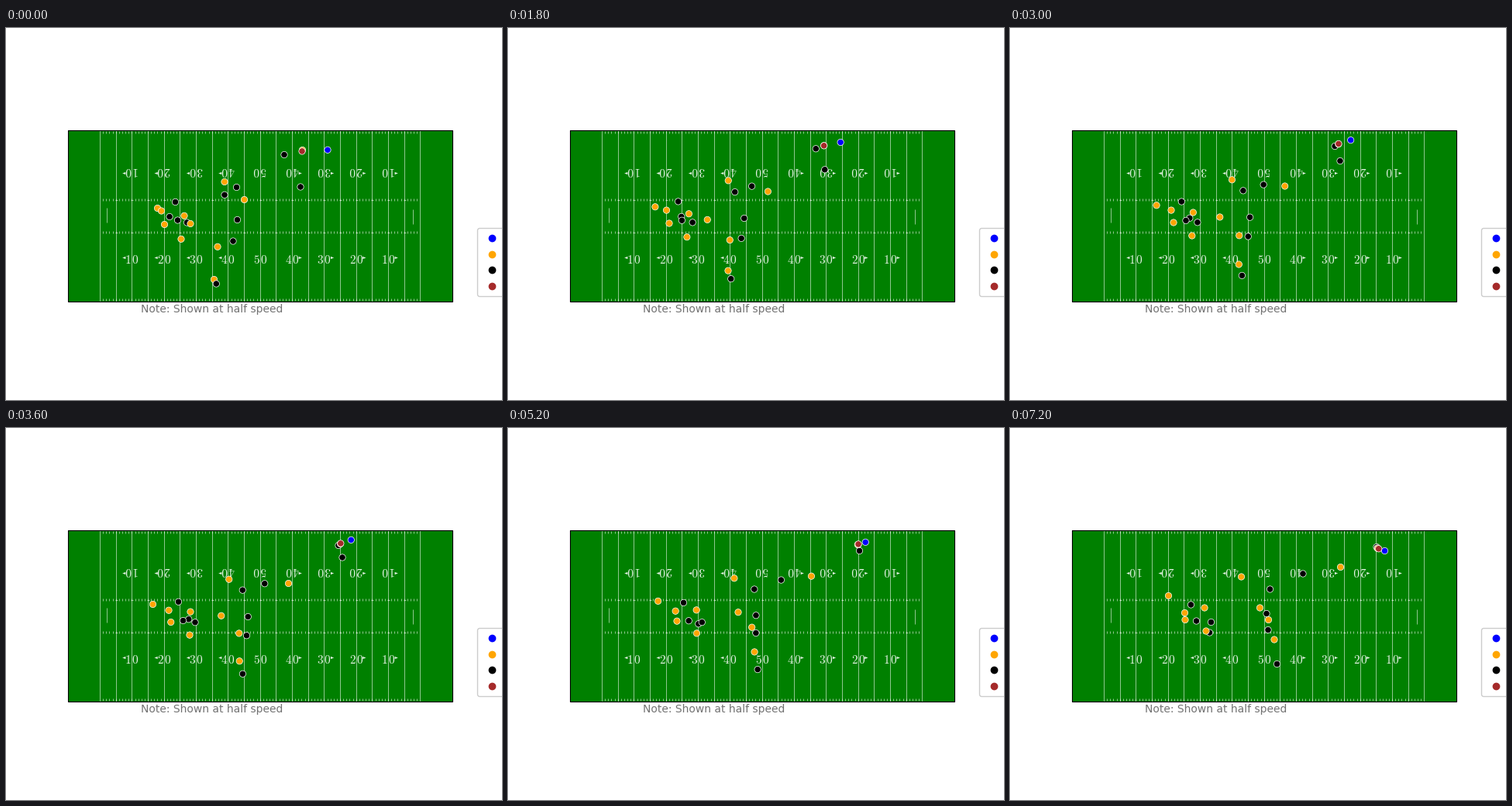
Write a matplotlib script that moves like this. It is 640 px wide and 480 px high and loops after 7.4 s.

```python
import numpy as np
import matplotlib.pyplot as plt
from matplotlib.animation import FuncAnimation
from matplotlib.patches import FancyBboxPatch, Polygon, Rectangle

plt.rcParams["font.family"] = "DejaVu Sans"

W, H = 640, 480
FRAMES, INTERVAL = 37, 200
LEFT, RIGHT, TOP, BOTTOM = 80, 576, 132.3, 352.6
YARD = (RIGHT - LEFT) / 120
CHALK = dict(colors="white", linewidths=0.4, zorder=2)

PROGRESS = np.linspace(0, 1, FRAMES)[:, None]
SLOW_START = (-2.5, 0)


def run(start, end, bend=SLOW_START):
    """Parabolic path: bend is how far the middle lies off the straight line."""
    start, end, bend = map(np.array, (start, end, bend))
    u = PROGRESS
    return start + (end - start) * u + 4 * u * (1 - u) * bend


# Painted from back to front
DEFENSE = [
    run((218.5, 224.5), (233.5, 228), (-3.5, -2)),
    run((211, 243.5), (257.5, 264), (1.5, -7)),
    run((221.5, 248), (240.5, 249)),
    run((233.5, 251), (259.5, 250.5)),
    run((282, 215.3), (335.5, 208), (-3.5, -2.5)),
    run((297.5, 205.5), (378, 188), (-4, 4)),
    run((298.5, 247.5), (331, 239.5)),
    run((293, 275), (333, 260.5)),
    run((359, 163.5), (473, 153.5), (13, -7)),
    run((380, 205), (474, 155), (7, -13)),
]
OFFENSE = [
    run((195.5, 232.5), (204.5, 216.5), (-10.5, 3)),
    run((200.5, 236), (225.5, 238.5), (-3, -2)),
    run((204.5, 253.5), (226, 247.5)),
    run((230, 242.3), (251, 232)),
    run((226, 272.3), (253, 262)),
    run((238, 252.5), (322.5, 232)),
    run((273, 282.3), (333.5, 247.5)),
    run((268.5, 324.5), (341, 273), (-3.5, 2)),
    run((282, 198.5), (298.5, 192)),
    run((307.5, 221.5), (426.5, 179.5)),
    run((382.5, 157.5), (474.5, 155.3), (3, -7)),
]
SAFETY = [run((271.3, 330), (344.5, 304.5))]
RUNNER = [run((415, 157.3), (483.5, 158.5), (-4, -13.5))]
BALL = [run((382, 159), (475.7, 155.8), (3, -8.5))]

GROUPS = [("black", DEFENSE), ("orange", OFFENSE), ("black", SAFETY),
          ("blue", RUNNER), ("brown", BALL)]


def yard_x(yards):
    return LEFT + np.asarray(yards) * YARD


def chalk_x(yards):
    """Whole-pixel column of a chalk line."""
    return np.floor(yard_x(yards) + 0.2)


def draw_number(yards, upside_down):
    x, side = yard_x(yards), np.sign(yards - 60)
    tens = 5 - abs(yards - 60) // 10
    y, arrow_y = (184.5, 187.5) if upside_down else (299.5, 296.5)
    ax.text(x, y, rf"${tens}\,0$", color="white", alpha=0.9, fontsize=11,
            rotation=180 * upside_down, ha="center", va="center",
            math_fontfamily="cm", zorder=3)
    if side:
        tip, base = x + 12.5 * side, x + 8.3 * side
        ax.add_patch(Polygon([(tip, arrow_y), (base, arrow_y - 1.6),
                              (base, arrow_y + 1.6)],
                             fc="white", ec="none", alpha=0.9, zorder=3))


def draw_field():
    box = (LEFT, TOP), RIGHT - LEFT, BOTTOM - TOP
    ax.add_patch(Rectangle(*box, fc="green", ec="none", zorder=1))
    ax.add_patch(Rectangle(*box, fc="none", ec="black", lw=0.8, zorder=4))

    ax.vlines(chalk_x(range(10, 111, 5)), TOP, BOTTOM, **CHALK)
    for y in (134.5, 221, 263.5, 350.5):
        ax.vlines(chalk_x(range(11, 110)), y - 1.5, y + 1.5, **CHALK)
    crosses = chalk_x(range(15, 110, 5)) + 0.5
    for y in (221.5, 263.5):
        ax.hlines([y] * len(crosses), crosses - 1.5, crosses + 1.5, **CHALK)

    ax.vlines(130, 231.5, 251, **CHALK)
    ax.vlines(525, 233.5, 253, **CHALK)

    for yards in range(20, 101, 10):
        draw_number(yards, False)
        draw_number(yards, True)


def draw_legend():
    ax.add_patch(FancyBboxPatch((608.5, 258.5), 120, 88, fc="white", ec="0.8",
                                lw=1, zorder=6,
                                boxstyle="round,pad=0,rounding_size=2.8"))
    for i, color in enumerate(("blue", "orange", "black", "brown")):
        ax.plot(627, 271 + 20.7 * i, "o", color=color, ms=6, zorder=7)


fig = plt.figure(figsize=(W / 100, H / 100), dpi=100, facecolor="white")
ax = fig.add_axes([0, 0, 1, 1])
ax.axis("off")

draw_field()
draw_legend()
ax.text(174, 367, "Note: Shown at half speed", color="0.45", fontsize=10)

tracks = np.array([path for _, paths in GROUPS for path in paths])
colors = [color for color, paths in GROUPS for _ in paths]
dots = ax.scatter(tracks[:, 0, 0], tracks[:, 0, 1], s=36, c=colors,
                  edgecolors="white", linewidths=0.5, zorder=5)
ax.set(xlim=(0, W), ylim=(H, 0))


def update(frame):
    dots.set_offsets(tracks[:, frame])
    return dots,


anim = FuncAnimation(fig, update, frames=FRAMES, interval=INTERVAL,
                     repeat=True, repeat_delay=0)
plt.show()
```
